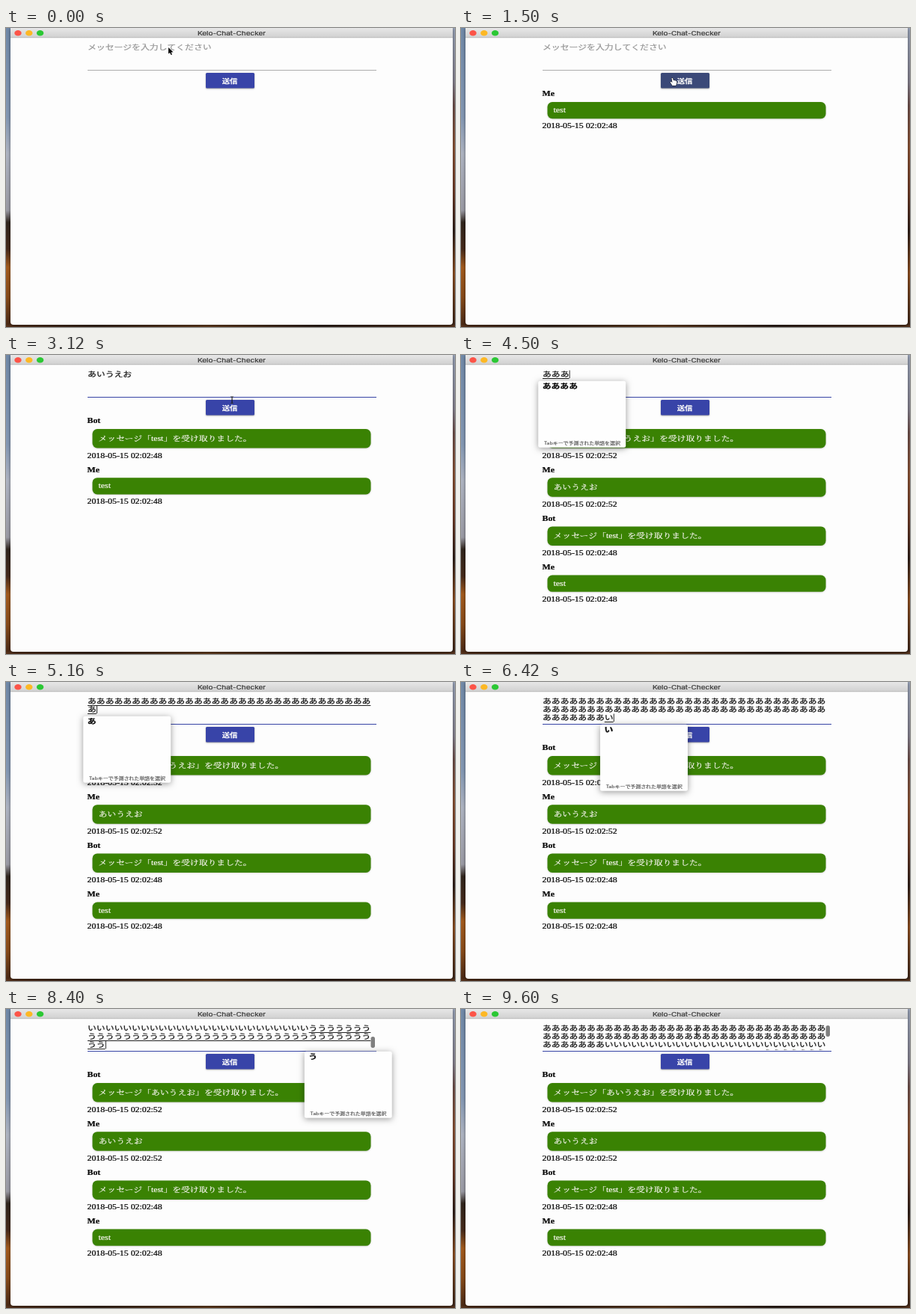
An HTML page with a canvas that plays this animation: 600x400 px, repeating every 9.72 s.

```html
<!DOCTYPE html>
<html lang="ja">
<head>
<meta charset="utf-8">
<title>Chat</title>
<style>
html, body { margin: 0; width: 100%; height: 100%; overflow: hidden; background: #fff; }
canvas { display: block; width: 600px; height: 400px; }
</style>
</head>
<body>
<canvas id="stage" width="600" height="400"></canvas>
<script>
const ctx = document.getElementById('stage').getContext('2d');
const LOOP = 9720, STEP = 60;

const SX = 0.739, SY = 0.583;
const SANS = '"Noto Sans CJK JP", "Noto Sans JP", sans-serif';
const SERIF = '"Liberation Serif", "Noto Serif CJK JP", "Noto Sans CJK JP", serif';
const INPUT = `500 16px ${SANS}`;

const FIELD = { left: 109, right: 495, top: 19, bottom: 55, firstRow: 25.5, pitch: 11, cols: 32, rows: 3 };
const BUTTON = { x: 267, y: 60, w: 65, h: 20.5 };
const focusSpans = [[240, 1380], [2100, 3480], [4020, LOOP]];
const hiddenSpans = [[480, 840], [2220, 3000], [4200, 8640]];

const messages = [
  { at: 1440, who: 'Me', text: 'test', time: '2018-05-15 02:02:48' },
  { at: 1680, who: 'Bot', text: 'メッセージ「test」を受け取りました。', time: '2018-05-15 02:02:48' },
  { at: 3540, who: 'Me', text: 'あいうえお', time: '2018-05-15 02:02:52' },
  { at: 3780, who: 'Bot', text: 'メッセージ「あいうえお」を受け取りました。', time: '2018-05-15 02:02:52' }
];

// Held keys: first press, start of auto-repeat, repeat interval, total, commit time.
const heldKeys = [
  { ch: 'あ', first: 4200, repeat: 4470, step: 22, max: 71, commit: 6180 },
  { ch: 'い', first: 6400, repeat: 6560, step: 18, max: 50, commit: 7480 },
  { ch: 'う', first: 7540, repeat: 7680, step: 17, max: 41, commit: 8520 }
];

const mousePath = [
  [0, 217, 26], [840, 217, 26], [1140, 283, 70], [1800, 283, 70], [2040, 300, 34],
  [3000, 300, 34], [3120, 302, 60], [3300, 300, 71], [3780, 300, 71], [4000, 315, 30], [LOOP, 315, 30]
];

const clamp = (v, lo, hi) => Math.max(lo, Math.min(hi, v));
const ease = p => p * p * (3 - 2 * p);
const progress = (t, from, to) => ease(clamp((t - from) / (to - from), 0, 1));
const spanAt = (spans, t) => spans.find(([from, to]) => t >= from && t < to);

function text(str, x, y, font, color, align = 'left') {
  ctx.save();
  ctx.translate(x, y + 3.3);
  ctx.scale(SX, SY);
  ctx.font = font;
  ctx.fillStyle = ctx.strokeStyle = color;
  ctx.lineWidth = 0.4;
  ctx.textAlign = align;
  ctx.fillText(str, 0, 0);
  ctx.strokeText(str, 0, 0);
  ctx.restore();
}

function widthOf(str, font) {
  ctx.font = font;
  return ctx.measureText(str).width * SX;
}

function rect(x, y, w, h, color) {
  ctx.fillStyle = color;
  ctx.fillRect(x, y, w, h);
}

function panel(x, y, w, h, r, fill, shadow, blur = 2, drop = 0.7) {
  ctx.save();
  if (shadow) {
    ctx.shadowColor = shadow;
    ctx.shadowBlur = blur;
    ctx.shadowOffsetY = drop;
  }
  ctx.fillStyle = fill;
  ctx.beginPath();
  ctx.roundRect(x, y, w, h, r);
  ctx.fill();
  ctx.restore();
}

function gradient(x0, y0, x1, y1, stops) {
  const g = ctx.createLinearGradient(x0, y0, x1, y1);
  stops.forEach(([p, c]) => g.addColorStop(p, c));
  return g;
}

function drawDesktop() {
  rect(0, 0, 300, 400, gradient(0, 0, 0, 400, [
    [0, '#7089a8'], [0.3, '#8498b4'], [0.42, '#aeb4c2'], [0.61, '#9a9aa4'], [0.65, '#2f241c'],
    [0.74, '#45291a'], [0.8, '#a35a1c'], [0.9, '#874a18'], [1, '#452614']]));
  rect(300, 0, 300, 400, gradient(0, 0, 0, 400, [
    [0, '#98a3b8'], [0.18, '#84808e'], [0.26, '#6e4f4a'], [0.4, '#8a5234'], [0.55, '#6d3a26'],
    [0.68, '#2e1e18'], [0.82, '#8d4e20'], [1, '#3a2418']]));
  rect(0, 397, 600, 3, gradient(0, 0, 600, 0, [
    [0, '#54301a'], [0.2, '#352318'], [0.45, '#633c1e'], [0.7, '#2c1e18'], [1, '#54321c']]));
}

function drawWindow() {
  panel(6, 0, 591, 397, [0, 0, 4, 4], '#fdfdfd', 'rgba(0,0,0,.5)', 4, 1);
  rect(6, 0, 591, 13, gradient(0, 0, 0, 13, [[0, '#e7e7e7'], [1, '#d0d0d0']]));
  rect(6, 12.5, 591, 0.7, '#b0b0b0');
  ['#fc5448', '#fdb824', '#2bc834'].forEach((color, i) => {
    ctx.fillStyle = color;
    ctx.beginPath();
    ctx.ellipse(16 + i * 14.8, 6.8, 4.7, 3.7, 0, 0, 7);
    ctx.fill();
  });
  text('Kelo-Chat-Checker', 301.5, 6.8, '13.5px Inter, sans-serif', '#3a3a3a', 'center');
}

function inputState(t) {
  if (t < 1380) return { value: 'test'.slice(0, clamp(Math.floor((t - 480) / 90) + 1, 0, 4)) };
  if (t >= 2220 && t < 3480) {
    const value = 'あいうえお'.slice(0, Math.floor((t - 2220) / 130) + 1);
    return t < 2940 ? { value, start: 0, candidate: value } : { value };
  }
  const state = { value: '' };
  for (const key of heldKeys) {
    if (t < key.first) break;
    const repeats = Math.max(0, Math.floor((t - key.repeat) / key.step) + 1);
    const count = Math.min(key.max, 1 + repeats);
    if (t < key.commit) {
      state.start = state.value.length;
      state.candidate = key.ch.repeat(count > 1 && count < 8 ? count + 1 : 1);
    }
    state.value += key.ch.repeat(count);
  }
  return state;
}

function drawField(t, input) {
  const { left, right, top, bottom, firstRow, pitch, cols, rows } = FIELD;
  const focus = spanAt(focusSpans, t);
  const lineCount = Math.max(1, Math.ceil(input.value.length / cols));
  const maxScroll = Math.max(0, lineCount - rows);
  const scroll = maxScroll * (1 - progress(t, 8940, 9480));
  const rowY = i => firstRow + (i - scroll) * pitch;
  const lastRow = input.value.slice((lineCount - 1) * cols);

  ctx.save();
  ctx.beginPath();
  ctx.rect(left - 1, top, right - left + 2, bottom - top);
  ctx.clip();
  if (!input.value) text('メッセージを入力してください', left, firstRow, INPUT, '#969696');
  for (let i = 0; i < lineCount; i++) {
    const line = input.value.slice(i * cols, (i + 1) * cols);
    text(line, left, rowY(i), INPUT, '#141414');
    const from = Math.max(0, input.start - i * cols);
    if (from < line.length) {
      const x = left + widthOf(line.slice(0, from), INPUT);
      rect(x, Math.round(rowY(i) + 5), widthOf(line.slice(from), INPUT), 1, '#222');
    }
  }
  const typing = spanAt(hiddenSpans, t);
  if (focus && (typing || (t - focus[0]) % 1080 < 1020)) {
    rect(left + widthOf(lastRow, INPUT) + 0.2, rowY(lineCount - 1) - 5, 0.9, 10.5, '#111');
  }
  ctx.restore();

  if (maxScroll) panel(487.5, 22 + 30 * scroll / lineCount, 5.5, 30 * rows / lineCount, 2.7, '#7f7f7f');
  rect(left, 56.3, right - left, 0.7, '#8c8c8c');
  if (focus) {
    const w = (right - left) * progress(t, focus[0], focus[0] + 160);
    rect((left + right - w) / 2, 56, w, 1, '#3644a4');
  }
  return { lastY: rowY(lineCount - 1) };
}

function drawButton(mouse) {
  const { x, y, w, h } = BUTTON;
  panel(x, y, w, h, 1.5, mouse.kind === 'hand' ? '#3b4978' : '#3844a8', 'rgba(0,0,0,.4)');
  text('送信', x + w / 2 - 0.5, 70.2, `bold 14px ${SANS}`, '#fafafa', 'center');
}

function drawMessages(t) {
  let y = 88;
  for (const m of messages.filter(m => m.at <= t).reverse()) {
    const h = m.text === 'test' ? 22.2 : 25.5;
    text(m.who, 108.5, y, `bold 16px ${SERIF}`, '#0c0c0c');
    panel(115.5, y + 11, 372, h, 6.5, '#3a8203', 'rgba(0,0,0,.2)');
    text(m.text, 123.5, y + 11 + h / 2 - 0.2, `16px ${SERIF}`, '#f2f2ea');
    y += 11 + h + 9.7;
    text(m.time, 108.5, y, `16px ${SERIF}`, '#0c0c0c');
    y += 19;
  }
}

function drawCandidates(input, lastY) {
  if (!input.candidate) return;
  const column = input.start % FIELD.cols;
  const x = FIELD.left - 5.8 + column * 16 * SX, y = lastY + 9.3;
  panel(x, y, 117, 89, 2.5, '#fefefe', 'rgba(0,0,0,.4)', 9, 1.5);
  text(input.candidate, x + 5.5, y + 6.5, `bold 16px ${SANS}`, '#0c0c0c');
  text('Tabキーで予測された単語を選択', x + 58.7, y + 81.5, `9.4px ${SANS}`, '#666', 'center');
}

function mouseAt(t) {
  const i = mousePath.findIndex(p => p[0] > t);
  const [t0, x0, y0] = mousePath[i - 1], [t1, x1, y1] = mousePath[i];
  const p = progress(t, t0, t1);
  const x = x0 + (x1 - x0) * p, y = y0 + (y1 - y0) * p;
  const onButton = x >= BUTTON.x && x < BUTTON.x + BUTTON.w && y > 63 && y < 81;
  return { x, y, kind: onButton ? 'hand' : t < 180 ? 'arrow' : 'beam' };
}

function shape(points, fill, stroke) {
  ctx.beginPath();
  points.forEach(([x, y]) => ctx.lineTo(x, y));
  ctx.closePath();
  ctx.lineWidth = 1;
  ctx.lineJoin = 'round';
  ctx.strokeStyle = stroke;
  ctx.stroke();
  ctx.fillStyle = fill;
  ctx.fill();
}

function drawMouse(t, { x, y, kind }) {
  if (spanAt(hiddenSpans, t)) return;
  ctx.save();
  ctx.translate(x, y);
  if (kind === 'arrow') {
    shape([[0, 0], [0, 8.5], [2, 7], [3.5, 10], [5, 9.5], [3.6, 6.5], [6.4, 6.3]], '#080808', '#fff');
  } else if (kind === 'hand') {
    shape([[-1.5, -3], [0, -3], [0.8, 0], [4, 0.6], [5.5, 2], [5, 5], [4, 7], [-0.5, 7], [-3.5, 2.5], [-2.5, 1.8], [-0.6, 3]],
      '#fff', '#111');
  } else {
    rect(-0.5, -4, 1.1, 8.5, '#111');
    rect(-2, -4.5, 4, 0.8, '#333');
    rect(-2, 4, 4, 0.8, '#333');
  }
  ctx.restore();
}

function draw(t) {
  const input = inputState(t), mouse = mouseAt(t);
  drawDesktop();
  drawWindow();
  drawButton(mouse);
  drawMessages(t);
  const { lastY } = drawField(t, input);
  drawCandidates(input, lastY);
  drawMouse(t, mouse);
}

const startTime = performance.now();
function tick() {
  const t = (performance.now() - startTime) % LOOP;
  draw(Math.min(LOOP - 2 * STEP, Math.floor(t / STEP) * STEP));
  requestAnimationFrame(tick);
}
tick();
</script>
</body>
</html>
```
